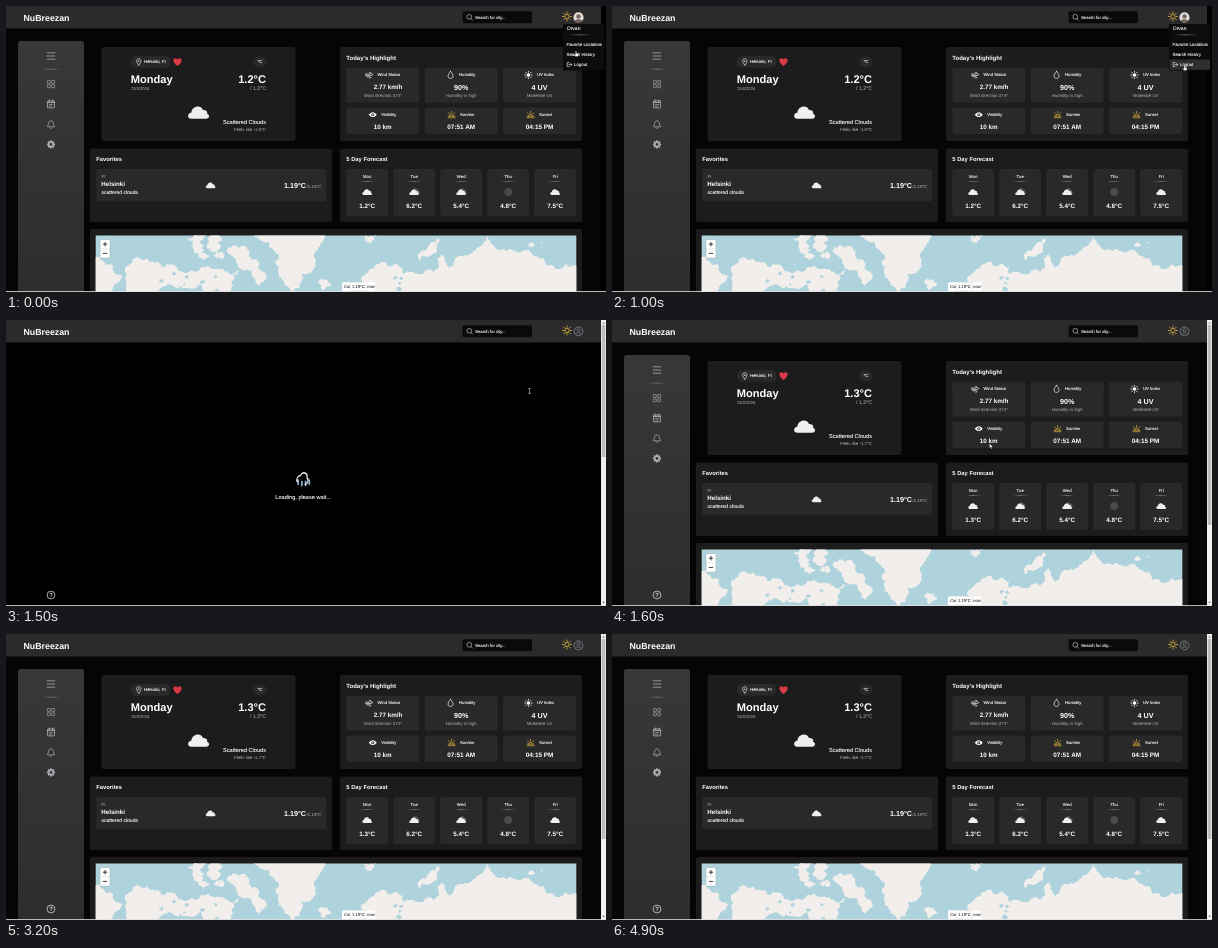
An HTML page for the animation above (5 s loop, 600x286 px).

```html
<!DOCTYPE html>
<html lang="en">
<head>
<meta charset="utf-8">
<title>Weather dashboard</title>
<style>
html, body { margin: 0; width: 100%; height: 100%; overflow: hidden; background: #000; }
svg { display: block; width: 100vw; height: 100vh; }
text { font-family: "Liberation Sans", Arial, sans-serif; text-rendering: geometricPrecision; white-space: pre; }
</style>
</head>
<body>
<svg id="stage" viewBox="0 0 600 286" preserveAspectRatio="none" xmlns="http://www.w3.org/2000/svg"></svg>
<script>
const WHITE = '#fff', GREY = '#949395', CARD = '#1d1c1d', TILE = '#2a292a', ICON = '#adb0b4', GOLD = '#dfb43c';
const WATER = '#afd3dc', LAND = '#f1eeec';
const STEP = 100, LOOP = 5000;

// Small regular text gets a hairline stroke so it stays legible
const text = (x, y, s, size, { fill = WHITE, bold = false, anchor = 'start', id = '' } = {}) =>
  `<text x="${x}" y="${y}" font-size="${size}" fill="${fill}" text-anchor="${anchor}"` +
  (bold ? ' font-weight="700"' : ` stroke="${fill}" stroke-width=".1"`) + `${id ? ` id="${id}"` : ''}>${s}</text>`;
const rect = (x, y, w, h, fill, r = 0, extra = '') =>
  `<rect x="${x}" y="${y}" width="${w}" height="${h}" rx="${r}" fill="${fill}" ${extra}/>`;
const line = (d, color = ICON, w = .7, extra = '') =>
  `<path d="${d}" fill="none" stroke="${color}" stroke-width="${w}" stroke-linecap="round" stroke-linejoin="round" ${extra}/>`;
const shape = (d, fill, extra = '') => `<path d="${d}" fill="${fill}" ${extra}/>`;
const dot = (x, y, r, fill, extra = '') => `<circle cx="${x}" cy="${y}" r="${r}" fill="${fill}" ${extra}/>`;
const ring = (x, y, r, color = ICON, w = .7) => dot(x, y, r, 'none', `stroke="${color}" stroke-width="${w}"`);
const at = (x, y, body, s = 1) => `<g transform="translate(${x} ${y}) scale(${s})">${body}</g>`;
const group = (id, body) => `<g id="${id}">${body}</g>`;
const divider = (x, y, w) => rect(x, y, w, .6, 'url(#fade)');
const repeat = (n, f) => Array.from({ length: n }, (_, i) => f(i)).join('');
const card = (x, y, w, h) => rect(x, y, w, h, CARD, 2.5);
const tile = (x, y, w, h) => rect(x, y, w, h, TILE, 2.5);
const title = (x, y, s, size = 5.8) => text(x, y, s, size, { bold: true });

const pen = document.createElement('canvas').getContext('2d');
pen.font = '100px "Liberation Sans", Arial, sans-serif';
const widthOf = (s, size) => pen.measureText(s).width * size / 100;

let seed = 7;
const random = () => (seed = (seed * 16807) % 2147483647) / 2147483647;

const CLOUD = 'M-7.5 6C-12 6-12 0-7.5-.5C-7-7 2-9 4.5-3C8.5-3.5 9.5 0 8.5 1C12 2 11 6 8 6Z';
const cloud = (x, y, s, fill = '#efefef') => at(x, y, shape(CLOUD, fill), s);

function sun(r, reach, color, filled) {
  const rays = repeat(8, i => line(`M0 ${r + 1}V${reach}`, color, .8, `transform="rotate(${i * 45})"`));
  return (filled ? dot(0, 0, r, color) : ring(0, 0, r, color, .8)) + rays;
}

// Coastline: key points roughened by midpoint displacement
function coast(points, fill = LAND) {
  let p = points;
  for (let round = 0; round < 4; round++) {
    p = p.flatMap(([x, y], i) => {
      const [u, v] = p[(i + 1) % p.length], k = (random() - .5) * .55;
      return [[x, y], [(x + u) / 2 - (v - y) * k, (y + v) / 2 + (u - x) * k]];
    });
  }
  return shape('M' + p.map(q => q.map(n => n.toFixed(1)).join(' ')).join('L') + 'Z', fill);
}

// Seeded islands or lakes spread over a box
const scatter = (n, x, y, w, h, size, fill) => repeat(n, () => {
  const cx = x + random() * w, cy = y + random() * h, r = size * (.4 + random() * .6);
  return coast([[cx - r, cy], [cx, cy - r * .8], [cx + r, cy], [cx, cy + r * .8]], fill);
});

const lands = () =>
  coast([[80, 256], [106, 259], [117, 270], [108, 280], [98, 300], [80, 300]]) +
  coast([[112, 300], [119, 273], [134, 252], [156, 261], [190, 266], [214, 263], [234, 264], [228, 280], [216, 300]]) +
  coast([[222, 240], [237, 240], [252, 255], [261, 270], [253, 280], [246, 264], [226, 249]]) +
  coast([[246, 222], [262, 236], [272, 248], [272, 266], [280, 300], [286, 292], [296, 268], [310, 254], [317, 222]]) +
  coast([[311, 276], [322, 273], [325, 279], [317, 284]]) +
  coast([[348, 300], [352, 282], [364, 263], [380, 256], [398, 268], [410, 268], [432, 262], [436, 248], [443, 262],
    [452, 250], [482, 230], [496, 243], [530, 250], [580, 256], [580, 300]]) +
  coast([[413, 254], [414, 246], [432, 231], [434, 234], [419, 250]]) +
  scatter(13, 178, 230, 56, 25, 8) + scatter(4, 358, 226, 16, 9, 5) + scatter(4, 524, 234, 16, 6, 3) +
  scatter(10, 150, 264, 64, 22, 3, WATER) + scatter(5, 385, 272, 30, 12, 3, WATER);

const header = () =>
  rect(0, 0, 595, 22.5, '#2c2b2c') +
  text(17.5, 15.4, 'NuBreezan', 8.8, { bold: true }) +
  rect(456.5, 5.2, 69.5, 12, '#0a0a0a', 1.6) +
  ring(463.3, 10.8, 2.4, '#d8d8d8', .6) + line('M465 12.6L466.5 14.1', '#d8d8d8', .6) +
  text(469, 12.9, 'Search for city...', 4.3) +
  at(561, 10.5, sun(2.1, 4.6, GOLD, false)) +
  at(572.5, 11.4,
    group('photo', dot(0, 0, 5.1, '#e4ddd8') + shape('M-3.7 3.6C-3.5 1.2 3.5 1.2 3.7 3.6C1.5 5.8-1.5 5.8-3.7 3.6Z', '#75655f') + dot(0, -1, 2.2, '#75655f')) +
    group('guest', ring(0, 0, 4.4, '#8d959f') + ring(0, -1.2, 1.5, '#8d959f', .6) + line('M-2.9 2.9C-2.1.9 2.1.9 2.9 2.9', '#8d959f', .6)));

const sideIcons = [
  line('M-3.8-3.2H3.8M-3.8 0H3.8M-3.8 3.2H3.8', ICON, .75),
  repeat(4, i => rect(-3.6 + (i % 2) * 4.3, -3.6 + (i >> 1) * 4.3, 2.9, 2.9, 'none', .2, `stroke="${ICON}" stroke-width=".6"`)),
  rect(-3.5, -3.3, 7, 7, 'none', .5, `stroke="${ICON}" stroke-width=".8"`) +
    line('M-3.5-1.8H3.5M-1.8-4.2V-3M1.8-4.2V-3', ICON, 1) + line('M-1.8.4H1.8M-1.8 2H.6', ICON, .7),
  line('M-3.4 2.2C-2 .6-3-3.5 0-3.6C3-3.5 2 .6 3.4 2.2ZM-1 3.6C-.5 4.4.5 4.4 1 3.6'),
  repeat(8, i => rect(-.9, -4.1, 1.8, 2.2, ICON, .3, `transform="rotate(${i * 45})"`)) + ring(0, 0, 2.2, ICON, 1.5)
];

const sidebar = () =>
  rect(12, 35, 66, 255, 'url(#side)', 2.5) + divider(35, 62.8, 20) +
  sideIcons.map((icon, i) => at(45, i ? 58 + i * 20.1 : 50, icon)).join('');

const help = () => ring(45, 275, 3.9, '#d2d2d2', .8) + text(45, 277.1, '?', 6, { fill: '#d2d2d2', anchor: 'middle', bold: true });

const mid = { anchor: 'middle' }, note = { fill: GREY, anchor: 'middle' };

const today = () =>
  card(95.5, 41, 194, 94) +
  rect(125, 50, 39.5, 11.8, TILE, 5) +
  at(132.8, 55.2, line('M0 3.8C-3.6.2-2.2-2.4 0-2.4C2.2-2.4 3.6.2 0 3.8Z', '#eee') + dot(0, 0, .7, '#eee')) +
  text(138, 57.3, 'Helsinki, FI', 4.4) +
  at(171.5, 56, shape('M0 4C-6-.2-4.3-3.7-2.1-3.7C-.8-3.7-.2-2.8 0-2.2C.2-2.8.8-3.7 2.1-3.7C4.3-3.7 6-.2 0 4Z', '#d93a45')) +
  rect(247.5, 50.5, 12.8, 10.8, TILE, 5) + text(254, 57.2, '°C', 4.4, mid) +
  title(124.8, 77, 'Monday', 11.1) + text(125, 84.2, '11/4/2024', 4.2, { fill: GREY }) +
  text(260, 76.6, '', 11.1, { bold: true, anchor: 'end', id: 'temp' }) +
  text(260, 84.4, '', 5.2, { fill: GREY, anchor: 'end', id: 'low' }) +
  cloud(192.7, 106.9, .97) +
  text(260, 117.6, 'Scattered Clouds', 5.6, { anchor: 'end' }) +
  text(260, 125, '', 4.4, { fill: GREY, anchor: 'end', id: 'feels' });

const horizon = line('M-3.5 3H3.5M-2 1.5A2 2 0 0 1 2 1.5M0-3.4V-1.8M-3-2L-2.2-1M3-2L2.2-1M-3.3 1.4H3.3', GOLD);
const stats = [
  { label: 'Wind Status', value: '2.77 km/h', note: 'Wind direction 274°', size: 6.3, shift: 5.2,
    icon: line('M-3.4-1H.6C2.6-1.4 1.8-3.4.4-2.6M-3.4.4H2.6C4.2.2 3.8-1.8 2.4-1.4M-2.2 1.8H.8C2.6 2.2 1.8 4 .6 3.2', WHITE) },
  { label: 'Humidity', value: '90%', note: 'Humidity is high', size: 7.2,
    icon: line('M0-3.6C-3.9.6-2.7 3.4 0 3.4C2.7 3.4 3.9.6 0-3.6Z', WHITE) },
  { label: 'UV Index', value: '4 UV', note: 'Moderate UV', size: 7.2, icon: sun(1.8, 3.7, WHITE, true) },
  { label: 'Visibility', value: '10 km', size: 6.3,
    icon: shape('M-4 0C-1.6-3.4 1.6-3.4 4 0C1.6 3.2-1.6 3.2-4 0Z', WHITE) + dot(0, 0, 1.5, TILE) + dot(0, 0, .7, WHITE) },
  { label: 'Sunrise', value: '07:51 AM', size: 6.4, icon: horizon },
  { label: 'Sunset', value: '04:15 PM', size: 6.4, icon: horizon }
];

const highlights = () =>
  card(334, 41, 242, 94) + title(340.3, 54, "Today's Highlight", 6) +
  stats.map((s, i) => {
    const x = 376.8 + (i % 3) * 78.4, y = i < 3 ? 61.8 : 101.5;
    const left = x - (widthOf(s.label, 4.2) + 12) / 2;
    return tile(x - 36.5, y, 73, s.note ? 35 : 26.5) + at(left + 3.5, y + 7.2, s.icon) +
      text(left + 12, y + 8.4, s.label, 4.2) +
      text(x + (s.shift || 0), y + 20 + s.size / 4, s.value, s.size, { bold: true, anchor: 'middle' }) +
      (s.note ? text(x, y + 29.2, s.note, 4.4, note) : '');
  }).join('');

const favorites = () =>
  card(84, 142.5, 242, 73.5) + title(90.3, 155.1, 'Favorites') + tile(90.3, 163, 230, 32.3) +
  text(95.6, 172.2, 'FI', 4.2, { fill: GREY }) + title(95.3, 180.3, 'Helsinki', 6.2) +
  text(95.5, 188, 'scattered clouds', 5) + cloud(204.7, 179.5, .45) +
  text(300, 181.5, '1.19°C', 7.2, { bold: true, anchor: 'end' }) + text(315.3, 181.5, '/1.19°C', 4.4, { fill: GREY, anchor: 'end' });

const days = [['Mon', ''], ['Tue', '6.2°C'], ['Wed', '5.4°C'], ['Thu', '4.8°C'], ['Fri', '7.5°C']];
const skies = {
  Tue: x => cloud(x + 1.4, 185, .4, '#5b5a5d') + cloud(x, 186.4, .45),
  Thu: x => dot(x, 186, 3.9, '#4b4a4c')
};
skies.Wed = skies.Tue;

const forecast = () =>
  card(334, 142.5, 242, 73.5) + title(340.3, 155.1, '5 Day Forecast') +
  days.map(([day, temp], i) => {
    const x = 361.2 + i * 47, sky = skies[day] || (x => cloud(x, 186.2, .45));
    return tile(x - 21, 163, 42, 47) + text(x, 172.2, day, 4.3, mid) + divider(x - 8, 175.2, 16) + sky(x) +
      text(x, 202.3, temp, 6.3, { bold: true, anchor: 'middle', id: temp ? '' : 'mon' });
  }).join('');

const map = () =>
  card(84, 223, 492, 70) +
  `<g clip-path="url(#mapBox)">${rect(89, 229, 482, 58, WATER)}${lands()}</g>` +
  rect(94, 233.5, 10, 18.6, WHITE, 1, 'stroke="#9aa" stroke-width=".5"') + line('M94 242.8H104', '#ccc', .4) +
  line('M97.2 238.2H100.8M99 236.4V240M97.2 247.4H100.8', '#111', .8) +
  rect(336, 276.2, 33, 9.2, WHITE, 1.5) + text(338, 282.4, 'Cur', 4, { fill: '#444' }) + text(361.2, 282.4, 'now', 4, { fill: '#444' }) +
  rect(344.3, 276.6, 16.2, 8.2, WHITE, 1, 'stroke="#ccc" stroke-width=".4"') + text(352.4, 282.4, '1.19°C', 4.1, { fill: '#333', anchor: 'middle' });

const menu = () =>
  rect(557, 18, 41.5, 46.5, '#0c0c0c', 1) + rect(557.6, 53.4, 40.4, 10.4, '#302f30', .8, 'id="hover"') +
  text(560.8, 24.2, 'Orvan', 5) + divider(560, 28.6, 28) +
  text(560.5, 40, 'Favorite Locations', 4.35) + text(560.5, 50, 'Search History', 4.35) +
  line('M563 56.6H561.2V60.6H563M562.8 58.6H565.8M564.6 57.4L565.8 58.6L564.6 59.8', WHITE, .6) + text(568, 60, 'Logout', 4.35);

const loader = () =>
  group('rain', '') + line('M-5.5 4.5C-8.6 3.8-8.4-1-5-1.3C-4.5-6.2 3-7 5-1.8C8.6-1.3 8.7 3.6 5.8 4.2', '#f4f4f4', 1.5, 'id="puff"') +
  text(297.2, 179, 'Loading, please wait...', 5.6, mid);

const scrollbar = () =>
  rect(595, 0, 5, 286, '#f1f1f1') + rect(595.7, 5, 3.6, 0, '#bdbdbd', 0, 'id="thumb"') +
  shape('M596.4 3.4L597.6 1.9L598.8 3.4Z', '#555') + shape('M596.4 281.8L597.6 283.3L598.8 281.8Z', '#555');

const edge = 'stroke="#222" stroke-width=".3"';
const cursors = () =>
  group('arrow', shape('M0 0V4.6L1.1 3.6L1.9 5.4L2.6 5.1L1.9 3.4H3.3Z', WHITE, edge)) +
  group('hand', shape('M-.5 0C-.5-.6.5-.6.5 0V1.8L2 2.1Q2.6 2.3 2.5 3.2L2 5H-.6L-1.8 3.1Q-1.7 2.4-.5 3.2Z', WHITE, edge)) +
  group('beam', line('M-.9-2.4H.9M0-2.4V2.4M-.9 2.4H.9', '#c4c4c4', .6));

document.getElementById('stage').innerHTML = `<defs>
  <linearGradient id="side" x1="0" y1="0" x2="0" y2="1"><stop stop-color="#393839"/><stop offset="1" stop-color="#2e2d2e"/></linearGradient>
  <linearGradient id="fade"><stop stop-color="#888" stop-opacity="0"/><stop offset=".5" stop-color="#999"/><stop offset="1" stop-color="#888" stop-opacity="0"/></linearGradient>
  <clipPath id="mapBox"><rect x="89.7" y="229.4" width="480.6" height="57"/></clipPath></defs>` +
  rect(0, 0, 600, 286, '#000') +
  group('page', rect(0, 22.5, 595, 263.5, '#050505') + sidebar() + today() + highlights() + favorites() + forecast() + map()) +
  group('loading', loader()) + group('help', help()) + header() + group('bar', scrollbar()) + group('menu', menu()) +
  rect(0, 285.2, 600, .8, '#e2e2e2') + cursors();

const $ = id => document.getElementById(id);
const show = (id, on) => $(id).setAttribute('display', on ? 'inline' : 'none');
const clamp = v => Math.min(1, Math.max(0, v));

// Slides down to Logout, rests, then sweeps off to the lower left
function pointer(t) {
  const slide = clamp((t - 200) / 300), sweep = Math.max(0, (t - 1200) / 400);
  return [570 + 2.5 * slide - 195 * sweep ** 4.8, 45.5 + 14 * slide + 64 * sweep ** 6];
}

function drawLoader(t) {
  const p = (t - 1100) / 400;
  $('puff').setAttribute('transform', `translate(297 158.5) rotate(${22 * p}) scale(${1 - .28 * p} ${1 + .1 * p})`);
  $('rain').innerHTML = repeat(4, i =>
    line(`M${292.2 + i * 3.7} ${161 + .9 * Math.sin(i * 2 + p * 5)}v4`, i % 2 ? '#8fb9c9' : '#93a5d8', 1.7));
}

function draw(t) {
  const signedIn = t < 1100, busy = t >= 1100 && t < 1600;
  show('page', !busy);
  show('loading', busy);
  show('help', !signedIn);
  show('bar', !signedIn);
  show('menu', signedIn);
  show('hover', t >= 400);
  show('photo', t < 1300);
  show('guest', t >= 1300);
  if (busy) drawLoader(t);

  const temp = signedIn ? '1.2°C' : '1.3°C';
  $('temp').textContent = $('mon').textContent = temp;
  $('low').textContent = '/ ' + temp;
  $('feels').textContent = `Feels like -${signedIn ? '1.9' : '1.7'}°C`;
  $('thumb').setAttribute('height', t < 1300 ? 116 : t < 1600 ? 132 : 200);

  const kind = t > 1700 ? '' : signedIn ? 'hand' : t === 1500 ? 'beam' : 'arrow';
  for (const id of ['arrow', 'hand', 'beam']) show(id, id === kind);
  if (kind) $(kind).setAttribute('transform', `translate(${pointer(t)})`);
}

const start = performance.now();
let last = -1;
function tick() {
  const t = Math.floor((performance.now() - start) % LOOP / STEP) * STEP;
  if (t !== last) draw(last = t);
  requestAnimationFrame(tick);
}
tick();
</script>
</body>
</html>
```
